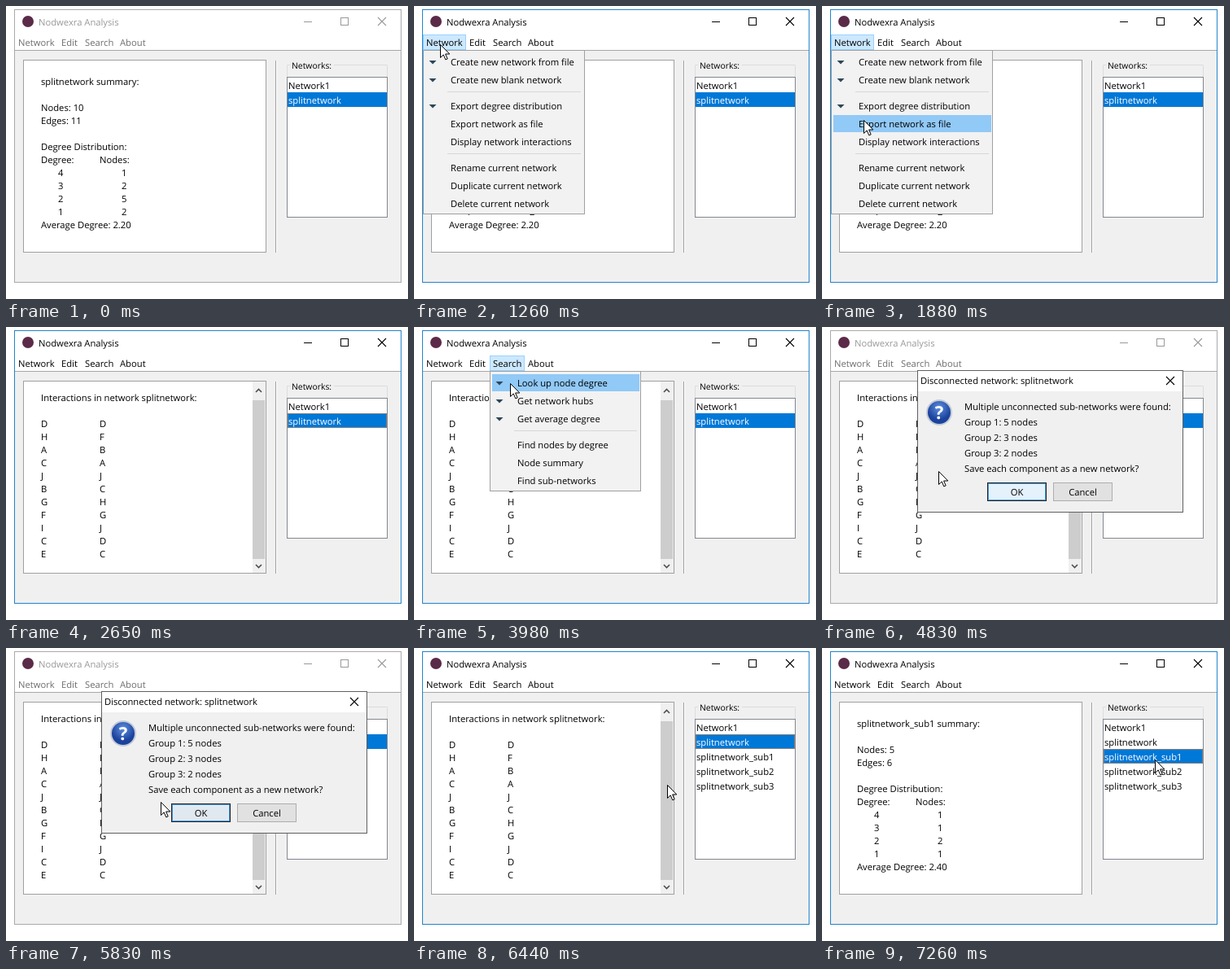
An HTML page that plays this animation: 494 by 360 pixels, repeating every 8000 ms.

```html
<!DOCTYPE html>
<html lang="en">
<head>
<meta charset="utf-8">
<title>Network summary</title>
<style>
html, body { margin: 0; width: 100%; height: 100%; overflow: hidden; background: #fff; }
svg { display: block; width: 494px; height: 360px; }
text { font: 11.23px "Open Sans", "Noto Sans", sans-serif; white-space: pre; text-rendering: geometricPrecision; }
</style>
</head>
<body>
<svg id="stage" viewBox="0 0 494 360"></svg>
<script>
const LOOP = 8000;
const BLUE = '#0078d7';
const stage = document.getElementById('stage');

const text = (x, y, s, fill = '#000', style = '') =>
  `<text x="${x}" y="${y}" fill="${fill}" style="${style}">${s}</text>`;
const rect = (x, y, w, h, fill) =>
  `<rect x="${x}" y="${y}" width="${w}" height="${h}" fill="${fill}"/>`;
const box = (x, y, w, h, fill, line, extra = '') =>
  `<rect x="${x + .5}" y="${y + .5}" width="${w - 1}" height="${h - 1}" fill="${fill}" stroke="${line}" ${extra}/>`;
const path = (d, line, width = 1, fill = 'none') =>
  `<path d="${d}" fill="${fill}" stroke="${line}" stroke-width="${width}"/>`;
const cross = (x, y, line) => path(`M${x} ${y}l10 10m0 -10l-10 10`, line, 1.1);

const menus = {
  Network: {
    x: 11, w: 199, h: 202, tab: [11, 53], seps: [105, 181],
    items: [[69, 'Create new network from file', 1], [91, 'Create new blank network', 1],
      [123, 'Export degree distribution', 1], [145, 'Export network as file'],
      [167, 'Display network interactions'], [199, 'Rename current network'],
      [221, 'Duplicate current network'], [243, 'Delete current network']]
  },
  Search: {
    x: 93, w: 186, h: 148, tab: [93, 43], seps: [127],
    items: [[69, 'Look up node degree', 1], [91, 'Get network hubs', 1], [113, 'Get average degree', 1],
      [145, 'Find nodes by degree'], [167, 'Node summary'], [189, 'Find sub-networks']]
  }
};

// Pointer moves in even steps; each key is [step, x, y].
const moves = [
  { from: 1260, start: 1570, dt: 77.5, keys: [[0, 32, 47], [5, 51, 140], [9, 60, 165]] },
  { from: 3660, start: 3910, dt: 76, keys: [[0, 112, 41], [2, 118, 69], [11, 143, 177]] },
  { from: 5680, start: 5680, dt: 76, keys: [[0, 143, 177], [6, 236, 201]] },
  { from: 6440, start: 6440, dt: 72, keys: [[0, 236, 201], [1, 311, 168], [6, 409, 137]] }
];

function pointerAt(t) {
  if (t < 1260 || (t >= 2570 && t < 3660)) return null;
  const { start, dt, keys } = moves.filter(m => t >= m.from).pop();
  const last = keys[keys.length - 1][0];
  const k = Math.max(0, Math.min(last, Math.floor((t + 8 - start) / dt) + 1));
  const i = Math.max(1, keys.findIndex(p => p[0] >= k));
  const [k0, x0, y0] = keys[i - 1], [k1, x1, y1] = keys[i];
  const f = (k - k0) / (k1 - k0);
  return [Math.round(x0 + (x1 - x0) * f), Math.round(y0 + (y1 - y0) * f)];
}

function frame(active) {
  const ink = active ? '#000' : '#999';
  return box(10, 4, 476, 336, '#fff', active ? '#2484cb' : '#aaa') +
    rect(11, 54, 474, 285, '#f0f0f0') + rect(11, 54, 474, 1, '#a8a8a8') +
    '<circle cx="27" cy="19" r="7" fill="#5b2a48"/>' +
    text(40, 24, 'Nodwexra Analysis', ink) +
    rect(366, 19, 10, 1, ink) + box(411, 14, 10, 10, 'none', ink) + cross(457, 14, ink) +
    box(21, 66, 299, 237, '#fff', '#a0a0a0') +
    rect(331, 67, 1, 236, '#a0a0a0') + rect(332, 67, 1, 236, '#fff');
}

function menuBar(active, open) {
  const tab = open ? box(menus[open].tab[0], 35, menus[open].tab[1], 19, '#cce8ff', '#99d1ff') : '';
  return tab + [[15, 'Network'], [68, 'Edit'], [97, 'Search'], [140, 'About']]
    .map(([x, s]) => text(x, 49, s, active ? '#000' : '#6d6d6d')).join('');
}

function summary(name, nodes, edges, counts, mean) {
  const line = (i, s, x = 43) => text(x, 97 + 16 * i, s);
  return line(0, name + ' summary:') + line(2, 'Nodes: ' + nodes) + line(3, 'Edges: ' + edges) +
    line(5, 'Degree Distribution:') + line(6, 'Degree:') + line(6, 'Nodes:', 115) +
    counts.map((n, i) => line(7 + i, 4 - i, 64) + line(7 + i, n, 142)).join('') +
    line(11, 'Average Degree: ' + mean);
}

function interactions() {
  const pairs = 'DD HF AB CA JJ BC GH FG IJ CD EC'.split(' ');
  return text(43, 91, 'Interactions in network splitnetwork:') +
    pairs.map((p, i) => text(43, 123 + 16 * i, p[0]) + text(115, 123 + 16 * i, p[1])).join('') +
    rect(303, 67, 16, 235, '#f0f0f0') + rect(303, 90, 15, 195, '#cdcdcd') +
    path('M307 80l3.5 -3.5l3.5 3.5M307 292l3.5 3.5l3.5 -3.5', '#505050', 1.6);
}

function list(names, selected, focus) {
  let s = path('M345.5 87V72.5H349M403 72.5H468.5V87', '#dcdcdc') +
    text(351, 77, 'Networks:', '#000', 'font-size:10.4px') +
    box(345, 87, 124, 173, '#fff', '#828790');
  names.forEach((name, i) => {
    const y = 88 + 18 * i, on = i === selected;
    if (on) {
      s += rect(346, y - 2 + 2, 122, 18, BLUE);
      if (focus) s += box(346, y, 122, 18, 'none', '#ff8728', 'stroke-dasharray="1 1"');
    }
    s += text(347, y + 14, name, on ? '#fff' : '#000');
  });
  return s;
}

function menu({ x, w, h, seps, items }, pointer) {
  let s = box(x, 54, w, h, '#f2f2f2', '#a0a0a0');
  for (const y of seps) s += rect(x + 30, y, w - 35, 1, '#d7d7d7');
  for (const [y, label, icon] of items) {
    if (pointer[1] >= y - 12 && pointer[1] < y + 10) s += rect(x + 3, y - 11, w - 5, 21, '#91c9f7');
    if (icon) s += path(`M${x + 7.5} ${y - 2}h9l-4.5 4.5z`, 'none', 0, '#2c4658');
    s += text(x + 34, y + 4, label);
  }
  return s;
}

function dialog(t) {
  const glow = .5 + .5 * Math.cos((t - 4830) / 1000 * Math.PI);
  const mix = (a, b) => Math.round(a + (b - a) * glow);
  const fill = `rgb(${mix(225, 229)},${mix(233, 241)},${mix(240, 251)})`;
  const lines = ['Multiple unconnected sub-networks were found:', 'Group 1: 5 nodes',
    'Group 2: 3 nodes', 'Group 3: 2 nodes', 'Save each component as a new network?'];
  return box(117, 53, 327, 175, '#fff', '#606060') + rect(118, 79, 325, 148, '#f0f0f0') +
    text(121, 70, 'Disconnected network: splitnetwork') + cross(423, 61, '#000') +
    '<defs><radialGradient id="ball" cy=".3"><stop stop-color="#5f8fe0"/><stop offset="1" stop-color="#1b429c"/></radialGradient></defs>' +
    '<circle cx="144" cy="105" r="15" fill="url(#ball)" stroke="#c3cbd8" stroke-width="2"/>' +
    text(144, 113, '?', '#fff', 'font-size:22px;font-weight:700;text-anchor:middle') +
    lines.map((s, i) => text(175, 102 + 19 * i, s)).join('') +
    box(203, 191, 73, 23, fill, '#222') + box(204, 192, 71, 21, 'none', BLUE, 'stroke-opacity=".7"') +
    text(239.5, 207, 'OK', '#000', 'text-anchor:middle') +
    box(284, 191, 73, 23, '#e1e1e1', '#adadad') +
    text(320.5, 207, 'Cancel', '#000', 'text-anchor:middle');
}

const arrow = ([x, y]) =>
  path(`M${x + .5} ${y + .5}v16l3.7 -3.6l2.6 6l2.4 -1l-2.6 -5.9h5.2z`, '#000', 1, '#fff');

function scene(t) {
  const open = t >= 1260 && t < 2570 ? 'Network' : t >= 3660 && t < 4750 ? 'Search' : '';
  const asking = t >= 4830 && t < 6440;
  const active = t >= 1260 && !asking;
  const pointer = pointerAt(t);
  const names = ['Network1', 'splitnetwork'];
  if (t >= 6440) for (let i = 1; i < 4; i++) names.push('splitnetwork_sub' + i);

  return frame(active) + menuBar(active, open) +
    (t < 2650 ? summary('splitnetwork', 10, 11, [1, 2, 5, 2], '2.20')
      : t < 7260 ? interactions()
      : summary('splitnetwork_sub1', 5, 6, [1, 1, 2, 1], '2.40')) +
    list(names, t < 7260 ? 1 : 2, t >= 2570 && !open && !asking) +
    (open ? menu(menus[open], pointer) : '') +
    (asking ? dialog(t) : '') +
    (pointer ? arrow(pointer) : '');
}

let shown = '', begin;
function tick(now) {
  begin ??= now;
  const next = scene((now - begin) % LOOP);
  if (next !== shown) stage.innerHTML = shown = next;
  requestAnimationFrame(tick);
}
requestAnimationFrame(tick);
</script>
</body>
</html>
```
